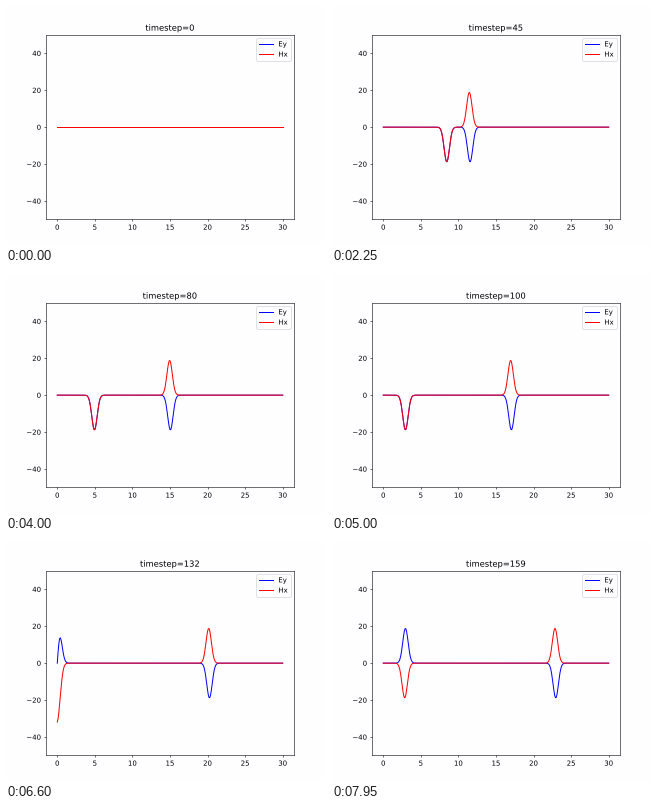
Recreate the animation shown at these times as a matplotlib script. Size 320 by 240 pixels, loop 8000 ms.

```python
import numpy as np
import matplotlib.pyplot as plt
from matplotlib.animation import FuncAnimation
from matplotlib.patheffects import Normal
from matplotlib.text import Text

FRAMES, INTERVAL = 160, 50
DX = 0.1             # cell size; the wave moves one cell per step
X_SRC = 10.0         # position of the current source
PEAK = -377 * DX / 2
T0, WIDTH = 29.5, 5  # pulse centre and width, in steps

plt.rcParams.update({
    "text.hinting": "none",
    "lines.linewidth": 1.43,  # just under one pixel, so flat lines stay crisp
    "figure.facecolor": "#fefdff",
    "axes.facecolor": "#fefdff",
    "figure.subplot.bottom": 0.1105,
})

x = np.linspace(0, 30, 301)
left = x < X_SRC - DX / 2


def pulse(dist, n):
    """Field at a travelled distance from the source after n steps."""
    return PEAK * np.exp(-((n - dist / DX - T0) / WIDTH) ** 2)


def fields(n):
    # The wall at x = 0 flips Ey and keeps the sign of Hx.
    ey = pulse(np.abs(x - X_SRC), n) - pulse(x + X_SRC, n)
    # Hx lives on the staggered grid, so right-going waves lead by one cell.
    ahead = x + DX
    hx = np.where(left, pulse(X_SRC - x, n), -pulse(ahead - X_SRC, n))
    return ey, hx + pulse(ahead + X_SRC, n)


fig, ax = plt.subplots(figsize=(6.4, 4.8), dpi=50)
line_e, = ax.plot(x, 0 * x, "b", label="Ey")
line_h, = ax.plot(x, 0 * x, "r", label="Hx")
ax.set_xlim(-1.5, 31.5)
ax.set_ylim(-50, 50)
ax.set_xticks(range(0, 31, 5))
ax.set_yticks(range(-40, 41, 20))
ax.legend(loc="upper right")
title = ax.set_title("timestep=0")

# Draw text as outlines, which keeps its position between whole pixels.
for text in fig.findobj(Text):
    text.set_path_effects([Normal()])


def draw(n):
    ey, hx = fields(n)
    line_e.set_ydata(ey)
    line_h.set_ydata(hx)
    title.set_text(f"timestep={n}")
    return line_e, line_h, title


anim = FuncAnimation(fig, draw, frames=FRAMES, interval=INTERVAL,
                     repeat=True, repeat_delay=0, blit=False)
plt.show()
```
